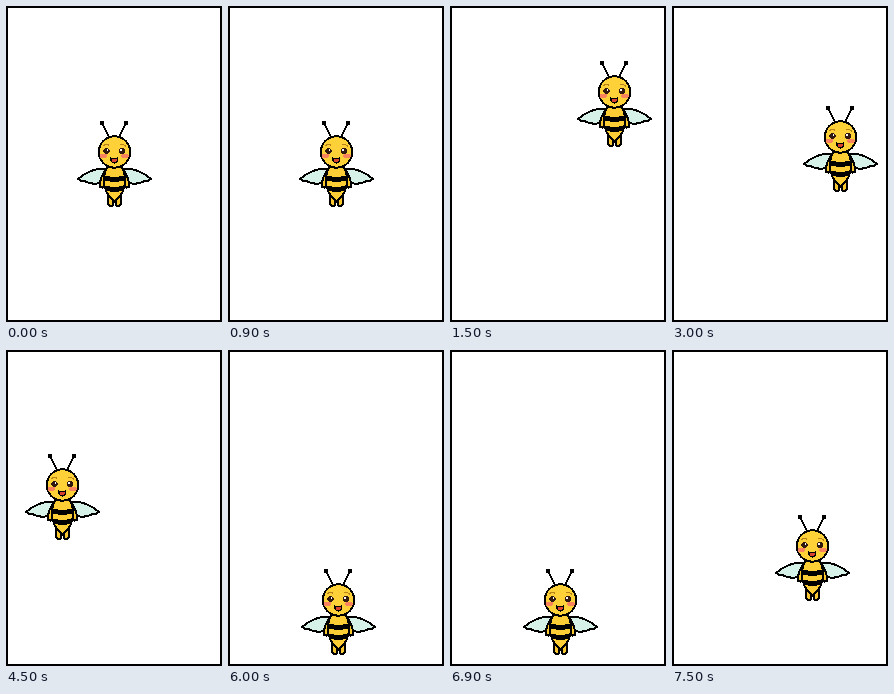
An HTML page that plays this animation: 216x316 px, repeating every 8000 ms.

```html
<!DOCTYPE html>
<html lang="en">
<head>
<meta charset="utf-8">
<title>Bee</title>
<style>
  html, body { margin: 0; width: 100%; height: 100%; overflow: hidden; background: #fff; }
  svg { display: block; width: 100%; height: 100%; }
</style>
</head>
<body>
<svg viewBox="0 0 216 316" shape-rendering="crispEdges">
  <rect x="1" y="1" width="214" height="314" fill="#fff" stroke="#000" stroke-width="2"/>
  <g id="bee" stroke="#000" stroke-width="2" stroke-linejoin="round" stroke-linecap="round">
    <defs>
      <path id="wing" d="M28 48C20 46.5 9 51 1 58Q4 60.5 8 60Q10 62.5 14 61.5Q17 64 20 62.5L26 61Z"/>
      <path id="arm" d="M27.5 50Q24 56 22.5 63Q22.5 67 25.5 66.5Q27 66 28 61"/>
      <path id="leg" d="M31.3 72V83Q31.3 85 34 85Q36.4 85 36.4 83V76"/>
      <path id="body" d="M31 45Q27 51 26.8 60Q27.5 73 37.5 80.5Q47.5 73 48.2 60Q48 51 44 45Z"/>
      <clipPath id="bodyClip"><use href="#body"/></clipPath>
      <g id="side">
        <use href="#wing" fill="#d6f1e8"/>
        <use href="#leg" fill="#f9c830"/>
        <use href="#arm" fill="#f9c830"/>
      </g>
      <g id="feeler">
        <path d="M25.5 3L32 16.5" fill="none" stroke-width="1.8"/>
        <rect x="23" y="0" width="4" height="4" rx="1" stroke="none"/>
      </g>
      <g id="cheekEye" stroke="none">
        <ellipse cx="26.5" cy="35" rx="3.8" ry="2.2" fill="#f8835c"/>
        <ellipse cx="29.5" cy="30" rx="3.2" ry="3" fill="#32190f"/>
        <circle cx="30.5" cy="28.7" r="1" fill="#fff"/>
        <path d="M26 25Q28.5 22.8 31.5 24" fill="none" stroke="#b98218" stroke-width="1"/>
      </g>
    </defs>
    <use href="#side"/>
    <use href="#side" transform="matrix(-1 0 0 1 75 0)"/>
    <use href="#body" fill="#fdcd35"/>
    <g clip-path="url(#bodyClip)" fill="none" stroke-width="5">
      <path d="M26 57Q37.5 59.5 49 57M26 67Q37.5 69.5 49 67"/>
    </g>
    <use href="#body" fill="none"/>
    <use href="#feeler"/>
    <use href="#feeler" transform="matrix(-1 0 0 1 74 0)"/>
    <circle cx="37.5" cy="31" r="15.7" fill="#ffd138"/>
    <use href="#cheekEye"/>
    <use href="#cheekEye" transform="matrix(-1 0 0 1 74.5 0)"/>
    <path d="M33.8 37Q37.3 38 40.8 37Q40.8 42 37.3 42Q33.8 42 33.8 37Z" fill="#d8432f" stroke-width="1.2"/>
  </g>
</svg>
<script>
  const LOOP = 8000, HOLD = 1500;
  const spots = [[71, 115], [127, 55], [131, 100], [19, 104], [73, 219], [103, 165]];
  const bee = document.getElementById('bee');

  function draw(now) {
    const [x, y] = spots[Math.floor(now % LOOP / HOLD)];
    bee.setAttribute('transform', `translate(${x} ${y})`);
  }

  const start = performance.now();
  function tick() {
    draw(performance.now() - start);
    requestAnimationFrame(tick);
  }
  tick();
</script>
</body>
</html>
```
